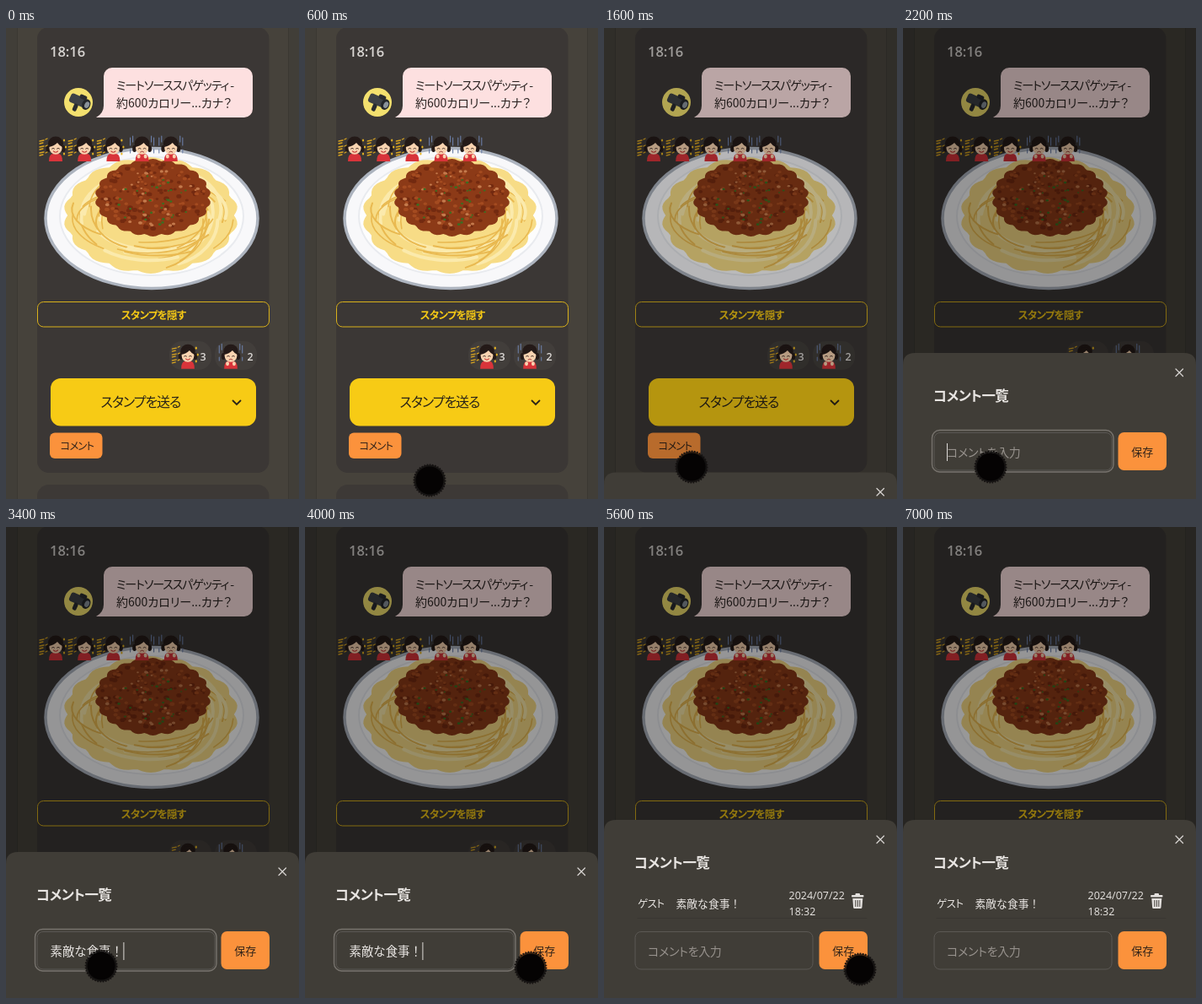
Write an HTML page that moves like this. It is 348 px wide and 558 px high and loops after 7.1 s.

```html
<!DOCTYPE html>
<html lang="ja">
<head>
<meta charset="utf-8">
<style>
  html, body { margin: 0; width: 100%; height: 100%; overflow: hidden; background: #413e38; }
  svg { display: block; width: 348px; height: 558px; }
  text { font-family: "Noto Sans CJK JP", "Noto Sans CJK", "Noto Sans", sans-serif; white-space: pre; }
  .kana { font-feature-settings: "palt"; }
  .latin { font-family: "Open Sans", "Noto Sans", sans-serif; }
</style>
</head>
<body>
<svg id="stage" viewBox="0 0 348 558" xmlns="http://www.w3.org/2000/svg"></svg>
<script>
const LOOP = 7100, STEP = 100;
const stage = document.getElementById('stage');

let seed = 11;
const rnd = (a = 0, b = 1) => {
  seed = (seed * 16807) % 2147483647;
  return a + (b - a) * seed / 2147483647;
};
const many = (n, fn) => Array.from({ length: n }, (_, i) => fn(i)).join('');

const box = (x, y, w, h, r, fill, extra = '') =>
  `<rect x="${x}" y="${y}" width="${w}" height="${h}" rx="${r}" fill="${fill}" ${extra}/>`;
const oval = (cx, cy, rx, ry, fill, extra = '') =>
  `<ellipse cx="${cx}" cy="${cy}" rx="${rx}" ry="${ry}" fill="${fill}" ${extra}/>`;
const line = (d, stroke, width, extra = '') =>
  `<path d="${d}" fill="none" stroke="${stroke}" stroke-width="${width}" stroke-linecap="round" ${extra}/>`;
const label = (s, x, y, size, fill, { cls = 'kana', gap = 0, weight = 400, anchor = 'start', id = '' } = {}) =>
  `<text ${id && `id="${id}"`} class="${cls}" x="${x}" y="${y}" font-size="${size}" fill="${fill}"
    font-weight="${weight}" letter-spacing="${gap}" text-anchor="${anchor}">${s}</text>`;

// Stamp characters, drawn around the centre of the face
function girl(happy) {
  const body = `<path d="M-8 16Q-8 7-3 7H3Q8 7 8 16Z" fill="#d8343a"/>` +
    oval(0, -5, 9, 8.5, '#241a18') + oval(-9, 1, 2.5, 4, '#241a18') + oval(9, 1, 2.5, 4, '#241a18') +
    oval(0, 0, 7.6, 7.8, '#f8d3b0') +
    `<path d="M-8-1Q-7-10 0-10T8-1Q4-3 2-6Q-2-2-8-1Z" fill="#241a18"/>` +
    line('M-4.5 1q1.5-1.5 3 0M1.5 1q1.5-1.5 3 0', '#3a2620', 0.9);
  if (happy) return body +
    line('M-2.5 4q2.5 2.5 5 0', '#c8403a', 1.1) +
    many(3, i => line(`M-19 ${-8 + i * 7}l5-1M-19 ${-5 + i * 7}l4-1M-12 ${-10 + i * 8}l2-1`, '#d9a520', 1.3)) +
    many(3, i => oval(10 + i % 2 * 2, -9 + i * 8, 1.1, 1.6, '#e6b422'));
  return body +
    line('M-2 5q2-2 4 0', '#a0403a', 1) + oval(-4, 10, 2, 2.5, '#f8d3b0') + oval(4, 10, 2, 2.5, '#f8d3b0') +
    line('M-14-12v9M-11-14v7M11-14v7M14-12v9M-14 2v4M14 2v4', '#6c7fa8', 1.1);
}
const stamp = (happy, x, y, k = 1) => `<g transform="translate(${x} ${y}) scale(${k})">${girl(happy)}</g>`;

function strand(color, width) {
  const cx = rnd(160, 184), cy = rnd(214, 230), rx = rnd(58, 88), ry = rnd(34, 58);
  const a = rnd(0, 6.28), b = a + rnd(0.7, 1.5);
  const at = v => `${(cx + rx * Math.cos(v)).toFixed(1)} ${(cy + ry * Math.sin(v)).toFixed(1)}`;
  return line(`M${at(a)}A${rx} ${ry} 0 0 1 ${at(b)}`, color, width);
}

function blob(cx, cy, rx, ry, bumps, depth, fill) {
  const pts = Array.from({ length: 120 }, (_, i) => {
    const a = i / 120 * Math.PI * 2, k = 1 - depth * (1 - Math.abs(Math.sin(a * bumps / 2)));
    return `${(cx + rx * k * Math.cos(a)).toFixed(1)} ${(cy + ry * k * Math.sin(a)).toFixed(1)}`;
  });
  return `<path d="M${pts.join('L')}Z" fill="${fill}"/>`;
}

function specks(n, fill, min, max, reach) {
  return many(n, () => {
    const a = rnd(0, 6.28), d = Math.sqrt(rnd()) * reach, r = rnd(min, max);
    return oval((174.5 + 66 * d * Math.cos(a)).toFixed(1), (201 + 43 * d * Math.sin(a)).toFixed(1),
      r.toFixed(1), (r * 0.75).toFixed(1), fill);
  });
}

const plate = () =>
  oval(173, 225.5, 126, 83, '#f8f8fa', 'stroke="#adb4bf" stroke-width="3.5"') +
  oval(173, 223, 109, 70, '#fdfdfd', 'stroke="#e9ebef" stroke-width="2"') +
  blob(172, 222, 104, 69, 18, 0.05, '#f7dc86') +
  many(34, i => strand(i % 2 ? '#fbeaac' : '#e9b950', i % 2 ? 4 : 2)) +
  many(14, () => strand('#e9b950', 1.6)) +
  blob(174.5, 201, 69, 46, 22, 0.06, '#8c3a17') +
  specks(90, '#732a10', 1.5, 3.5, 0.95) + specks(70, '#a44b20', 1.5, 3, 0.95) +
  specks(28, '#c47a4c', 1.2, 2.6, 0.85) + specks(34, '#3b6f22', 0.9, 2, 0.75);

const avatar = () => oval(86, 88, 17, 17, '#f3e06e') +
  `<g transform="translate(87 87) rotate(24)">` +
  box(-12, -6, 20, 11, 3, '#3d4146') + box(-2, -9, 9, 5, 2, '#2a2c30') +
  oval(9, 0, 5, 6.5, '#24262a') + oval(10, 0, 2.8, 4, '#8a929a') +
  box(-4, 4, 5, 9, 2, '#2a2c30') + `</g>`;

const page = () =>
  box(0, 0, 348, 558, 0, '#413e38') +
  box(13.5, -20, 322, 600, 0, '#46423b', 'stroke="#3b3832"') +
  box(37, -1, 275.5, 528, 14, '#3b3735') + box(37, 541, 275.5, 60, 14, '#3d3936') +
  label('18:16', 52, 34, 16.5, '#d8d5d2', { cls: 'latin', weight: 600 }) +
  avatar() +
  `<path d="M126 47H283a10 10 0 0 1 10 10V96a10 10 0 0 1-10 10H107Q116 101 116 92V57a10 10 0 0 1 10-10Z" fill="#fde0e0"/>` +
  label('ミートソーススパゲッティ -', 131, 73, 14, '#2b2422', { gap: -1.1 }) +
  label('約600カロリー...カナ？', 131, 94, 14, '#2b2422') +
  plate() +
  many(5, i => stamp(i < 3, 59 + i * 34.2, 142)) +
  box(37.5, 324.5, 275, 29.5, 7, 'none', 'stroke="#d9b11b"') +
  label('スタンプを隠す', 175, 345, 12.5, '#f6c915', { gap: -0.7, weight: 700, anchor: 'middle' }) +
  box(194, 371, 50, 34, 15, '#423e3b') + box(248, 371, 50, 34, 15, '#423e3b') +
  stamp(true, 216, 388, 0.98) + stamp(false, 267, 388, 0.98) +
  label('3', 230.5, 394, 12.5, '#dedbd8', { cls: 'latin', weight: 600 }) +
  label('2', 286.5, 394, 12.5, '#dedbd8', { cls: 'latin', weight: 600 }) +
  box(53, 415, 244, 56.5, 12, '#f7cb15') +
  label('スタンプを送る', 160, 449, 16, '#2a2418', { gap: -1, weight: 500, anchor: 'middle' }) +
  line('M269.5 441.5l4.5 4.5l4.5-4.5', '#2a2418', 1.8) +
  box(52, 479.5, 62.5, 30.5, 6, '#fb923c') +
  label('コメント', 64.5, 500, 12.5, '#33241a', { gap: -1, weight: 500 });

const trash = () => `<g fill="#e4e1de">` + box(294, 436, 14.5, 2.4, 1, '#e4e1de') +
  box(298.5, 434, 5.5, 3, 1, '#e4e1de') + `<path d="M295.3 440H307.3L306.5 450.5Q306.4 452 305 452H297.6Q296.2 452 296.1 450.5Z"/></g>` +
  line('M298.8 442.5v7M301.3 442.5v7M303.8 442.5v7', '#403d37', 1);

const sheet = () =>
  `<g id="sheet"><path id="panel" fill="#403d37"/>` +
  `<g id="head">` +
  label('コメント一覧', 36, 57, 16.5, '#e8e5e2', { gap: -0.6, weight: 600 }) +
  line('M324 19l8.5 8.5M332.5 19l-8.5 8.5', '#d6d3d0', 1.3) + `</g>` +
  `<g id="row">` +
  label('ゲスト', 40, 451, 12.5, '#e8e5e2', { gap: -0.5 }) +
  label('素敵な食事！', 85.5, 451, 12.8, '#e8e5e2', { cls: '' }) +
  label('2024/07/22', 219.5, 441, 12.5, '#e8e5e2', { cls: 'latin' }) +
  label('18:32', 219.5, 460, 12.5, '#e8e5e2', { cls: 'latin' }) +
  trash() + line('M40 463.5H312', '#393631', 1) + `</g>` +
  box(37, 479.5, 211, 44.5, 7, '#403d37', 'stroke="#5b5854"') +
  `<g id="focus">` + box(34.5, 476.5, 215.5, 49.5, 9, 'none', 'stroke="#77736d" stroke-width="1.4"') +
  `<path id="caret" stroke="#dedbd8"/></g>` +
  label('', 52, 508, 14, '#96918c', { gap: -0.3, id: 'hint' }) +
  label('', 52.5, 508, 14.4, '#e8e5e2', { cls: '', id: 'typed' }) +
  box(255.5, 479, 57.5, 45, 7, '#fb923c') +
  label('保存', 284.3, 506.5, 13, '#33241a', { cls: '', weight: 500, anchor: 'middle' }) + `</g>`;

const pointer = () => `<g id="pointer">` +
  oval(0, 0, 18.5, 18.5, '#0a0808', 'fill-opacity=".75" stroke="#151211" stroke-width="2" stroke-dasharray="1.6 1.6"') +
  oval(0, 0, 16.5, 16.5, '#050303') + `</g>`;

stage.innerHTML = page() + box(0, 0, 348, 558, 0, '#000', 'id="shade"') + sheet() + pointer();
const el = id => document.getElementById(id);
const show = (id, on) => el(id).setAttribute('visibility', on ? 'inherit' : 'hidden');
const move = (id, x, y) => el(id).setAttribute('transform', `translate(${x} ${y})`);

const ramp = (t, a, b) => Math.min(1, Math.max(0, (t - a) / (b - a)));
const smooth = k => k * k * (3 - 2 * k);

// time, x, y
const path = [
  [300, 205, 529], [600, 148, 536], [1100, 104, 520], [3300, 104, 520], [4000, 268, 522],
  [4100, 270, 522], [4500, 304, 524], [5700, 304, 524], [6300, 352, 578],
];
function pointerAt(t) {
  const i = Math.max(1, path.findIndex(p => p[0] >= t));
  const [a, b] = [path[i - 1], path[i]], k = smooth(ramp(t, a[0], b[0]));
  return [a[1] + (b[1] - a[1]) * k, a[2] + (b[2] - a[2]) * k];
}

function render(t) {
  const saved = t >= 4800, top = saved ? 347 : 385;
  const focused = t >= 2000 && !saved;
  const entry = t < 2800 || saved ? '' : t < 2900 ? '素敵な' : t < 3000 ? '素敵な食事' : '素敵な食事！';

  el('shade').setAttribute('opacity', 0.4 * ramp(t, 1400, 1700));
  move('sheet', 0, 173 * (1 - smooth(ramp(t, 1450, 2000))));
  el('panel').setAttribute('d', `M0 570V${top + 14}Q0 ${top} 14 ${top}H334Q348 ${top} 348 ${top + 14}V570Z`);
  show('sheet', t >= 1500);
  move('head', 0, top);
  show('row', saved);
  show('focus', focused);
  el('hint').textContent = entry ? '' : 'コメントを入力';
  el('typed').textContent = entry;
  const caretX = 52.5 + entry.length * 14.4 + (entry ? 1 : 0);
  el('caret').setAttribute('d', `M${caretX} 492V513`);

  const moving = t >= 400 && t < 6300;
  show('pointer', moving);
  if (moving) move('pointer', ...pointerAt(t));
}

const start = performance.now();
function frame() {
  const t = (performance.now() - start) % LOOP;
  render(Math.floor(t / STEP) * STEP);
  requestAnimationFrame(frame);
}
frame();
</script>
</body>
</html>
```
